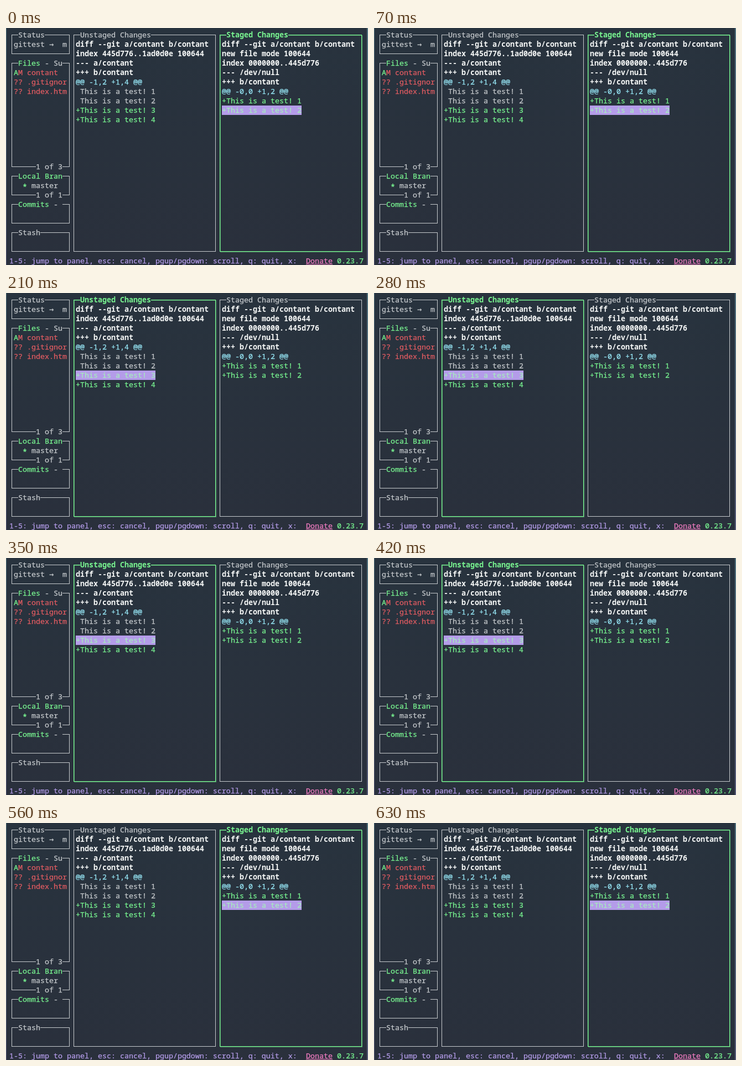
Recreate the animation shown at these times as an HTML page with a canvas. Size 654x428 px, loop 700 ms.

```html
<!DOCTYPE html>
<html lang="en">
<head>
<meta charset="utf-8">
<style>
  html, body { margin: 0; width: 654px; height: 428px; overflow: hidden; background: #28313c; }
  canvas { display: block; }
</style>
</head>
<body>
<canvas id="stage" width="654" height="428"></canvas>
<script>
const ctx = document.getElementById('stage').getContext('2d');
const LOOP = 700, CELL = 8, ROW = 17;
const MONO = '"Noto Sans Mono", "DejaVu Sans Mono", monospace';
const GREY = '#c6cacd', WHITE = '#f6f8f7', GREEN = '#79f691', RED = '#e25c62',
      CYAN = '#98e9f8', PURPLE = '#b49ce9', PINK = '#f07cc1';
const colX = c => 6 + c * CELL;
const rowY = r => 4 + r * ROW;

function text(c, r, str, color = GREY, bold = false, family = MONO) {
  ctx.font = `${bold ? 'bold ' : ''}13.333px ${family}`;
  ctx.fillStyle = ctx.strokeStyle = color;
  ctx.lineWidth = 0.25;
  ctx.fillText(str, colX(c), rowY(r) + 13);
  // A hairline outline gives regular text the weight of smoothed terminal type
  if (!bold) ctx.strokeText(str, colX(c), rowY(r) + 13);
}

// Border with gaps for the title and footer cells, given as [from, to)
function border(x, y, w, h, title, foot) {
  const rule = (ry, [from, to]) => {
    ctx.fillRect(x, ry, colX(from) - x, 1);
    ctx.fillRect(colX(to), ry, x + w - colX(to), 1);
  };
  rule(y, title);
  rule(y + h, foot);
  ctx.fillRect(x, y + 1, 1, h - 1);
  ctx.fillRect(x + w - 1, y + 1, 1, h - 1);
}

function panel(c1, r1, c2, r2, title, { note = '', foot = '', color = GREY, active = false } = {}) {
  const x = colX(c1) + 4, y = rowY(r1) + 8, w = (c2 - c1) * CELL + 1, h = (r2 - r1) * ROW;
  const t = c1 + 2, f = c2 - 1 - foot.length;
  const gaps = [[t, t + title.length + note.length], [f, c2 - 1]];
  ctx.fillStyle = active ? GREEN : GREY;
  border(x, y, w, h, ...gaps);
  if (active) {
    ctx.globalAlpha = 0.5;
    border(x + 1, y + 1, w, h, ...gaps);
    ctx.globalAlpha = 1;
  }
  text(t, r1, title, active ? GREEN : color, active);
  text(t + title.length, r1, note);
  text(f, r2, foot);
}

function diff(c, heads, hunk, lines, selected) {
  heads.forEach((s, i) => text(c, i + 1, s, WHITE, true));
  const top = heads.length + 1;
  text(c, top, hunk, CYAN);
  lines.forEach((s, i) => {
    const r = top + 1 + i;
    if (i === selected) {
      ctx.fillStyle = PURPLE;
      ctx.fillRect(colX(c), rowY(r), s.length * CELL, ROW);
    }
    text(c, r, s, i === selected ? '#a5eebd' : s[0] === '+' ? GREEN : GREY);
  });
}

function fade(x, w, from, to) {
  const g = ctx.createLinearGradient(0, 0, 0, 428);
  g.addColorStop(0, from);
  g.addColorStop(1, to);
  ctx.fillStyle = g;
  ctx.fillRect(x, 0, w, 428);
}

function draw(ms) {
  const unstaged = ms >= 210 && ms < 560;
  fade(0, 654, '#28333e', '#2a303c');
  fade(0, 1, '#52727e', '#585b78');
  fade(652, 2, '#52727e', '#585b78');

  panel(0, 0, 13, 2, 'Status');
  text(1, 1, 'gittest');
  text(9, 1, '→', GREY, false, '"DejaVu Sans Mono", monospace');
  text(12, 1, 'm');

  panel(0, 3, 13, 14, 'Files', { note: ' - Su', foot: '1 of 3', color: GREEN });
  text(1, 4, 'A', GREEN);
  text(2, 4, 'M contant', RED);
  text(1, 5, '?? .gitignor', RED);
  text(1, 6, '?? index.htm', RED);

  panel(0, 15, 13, 17, 'Local Bran', { foot: '1 of 1', color: GREEN });
  text(3, 16.15, '*', GREEN, true);
  text(5, 16, 'master');

  panel(0, 18, 13, 20, 'Commits', { note: ' - ', color: GREEN });
  panel(0, 21, 13, 23, 'Stash');

  panel(14, 0, 46, 23, 'Unstaged Changes', { active: unstaged });
  diff(15,
    ['diff --git a/contant b/contant', 'index 445d776..1ad0d0e 100644', '--- a/contant', '+++ b/contant'],
    '@@ -1,2 +1,4 @@',
    [' This is a test! 1', ' This is a test! 2', '+This is a test! 3', '+This is a test! 4'],
    unstaged ? 2 : -1);

  panel(47, 0, 79, 23, 'Staged Changes', { active: !unstaged });
  diff(48,
    ['diff --git a/contant b/contant', 'new file mode 100644', 'index 0000000..445d776', '--- /dev/null', '+++ b/contant'],
    '@@ -0,0 +1,2 @@',
    ['+This is a test! 1', '+This is a test! 2'],
    unstaged ? -1 : 1);

  text(0, 24, '1-5: jump to panel, esc: cancel, pgup/pgdown: scroll, q: quit, x:', PURPLE);
  text(67, 24, 'Donate', PINK);
  ctx.fillRect(colX(67), rowY(24) + 14, 6 * CELL, 1);
  text(74, 24, '0.23.7', GREEN);
}

const start = performance.now();
function tick() {
  draw((performance.now() - start) % LOOP);
  requestAnimationFrame(tick);
}
tick();
</script>
</body>
</html>
```
